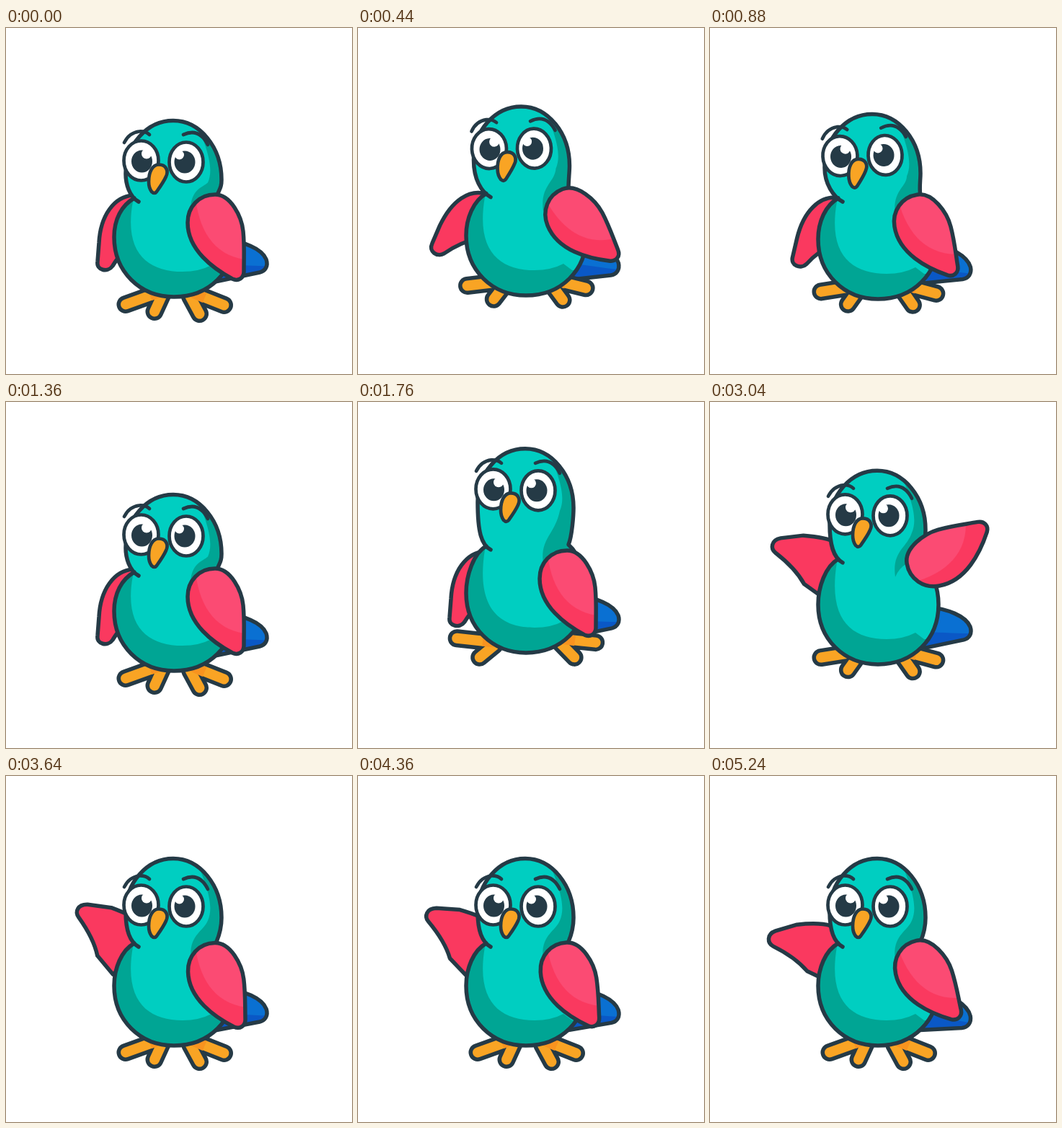
These frames come from a looping animation (480x480 px, 5280 ms). An HTML page:

```html
<!DOCTYPE html>
<html lang="en">
<head>
<meta charset="utf-8">
<title>Dancing parrot</title>
<style>
  html, body { margin: 0; width: 100%; height: 100%; overflow: hidden; background: #fff; }
  svg { display: block; width: 100%; height: 100%; }
  .ink { stroke: #253a46; stroke-width: 5.5; stroke-linecap: round; stroke-linejoin: round; }
  .line { fill: none; }
  .thin { stroke-width: 4.7; }
  .pink { fill: #fa395f; }
  .teal { fill: #00a594; }
  .foot { fill: none; stroke-linecap: round; stroke-linejoin: round; }
  .rim { stroke: #253a46; stroke-width: 25; }
  .skin { stroke: #f9a424; stroke-width: 14; }
  .shade { stroke: #f8931f; stroke-width: 14; stroke-linecap: butt; }
</style>
</head>
<body>
<svg viewBox="0 0 480 480">
  <defs>
    <clipPath id="bodyClip"><path id="bodyMask"/></clipPath>
    <clipPath id="wingClip"><use href="#wingShape"/></clipPath>
    <clipPath id="tailClip"><use href="#tailShape"/></clipPath>
    <path id="wingShape" d="M2 -31C-20 -31 -36 -14 -36 8C-36 46 0 72 26 86C34 90 42 85 42 76C42 55 43 40 41 20C39 0 24 -31 2 -31Z"/>
    <path id="tailShape" d="M10 -35C40 -32 65 -22 71 -7C74 2 70 9 62 11L0 24Z"/>
    <path id="leftToes" d="M0 0L50 -18M40 10L51 -14"/>
    <path id="rightToes" d="M0 0L-43 -17M-34 12L-47 -12"/>
  </defs>

  <path id="leftWing" class="ink pink"/>
  <g id="tail">
    <use href="#tailShape" fill="#0a58c6"/>
    <path clip-path="url(#tailClip)" fill="#0a70d2" d="M0 -45H80V2C55 3 30 0 0 0Z"/>
    <use href="#tailShape" class="ink line"/>
  </g>
  <g id="leftFoot" class="foot">
    <use href="#leftToes" class="rim"/>
    <use href="#leftToes" class="skin"/>
    <path class="shade" d="M34 -12L50 -18"/>
  </g>
  <g id="rightFoot" class="foot">
    <use href="#rightToes" class="rim"/>
    <use href="#rightToes" class="skin"/>
    <path class="shade" d="M-27 -10L-43 -17"/>
  </g>

  <path id="bodyFill" class="teal"/>
  <path id="bodyLight" fill="#00cec1" clip-path="url(#bodyClip)"/>
  <path id="bodyLine" class="ink line"/>

  <g id="face">
    <g class="ink thin" fill="#fff">
      <ellipse cx="187.5" cy="184" rx="24" ry="27.5"/>
      <ellipse cx="250" cy="186" rx="23.5" ry="27.5"/>
    </g>
    <g fill="#253a46">
      <ellipse cx="188.5" cy="185" rx="14.5" ry="15.5"/>
      <ellipse cx="248" cy="186" rx="14.5" ry="15.5"/>
    </g>
    <g fill="#fff">
      <circle cx="195" cy="174.5" r="7"/>
      <circle cx="240.5" cy="176" r="6.5"/>
    </g>
    <path class="ink thin" fill="#f9a424" d="M198 213C198 200 203 189.5 212 189.5C222 189.5 226 198 222 206C219 213 214 220 209 227Q206 231 202 227C199 223 198 218 198 213Z"/>
    <path class="ink line thin" d="M164 159Q171 145 185 143.5Q194 143 199 148M246 148Q268 138 280 162"/>
  </g>

  <g id="rightWing">
    <use href="#wingShape" class="pink"/>
    <path clip-path="url(#wingClip)" fill="#fb4b73" d="M-26 -40C-24 14 -2 56 50 60V-40Z"/>
    <use href="#wingShape" class="ink line"/>
  </g>
</svg>
<script>
const LOOP = 5280, BEAT = 680, JUMP_START = 2 * BEAT, WAVE_START = 5 * BEAT;
const $ = id => document.getElementById(id);
const put = (id, x, y, angle) =>
  $(id).setAttribute("transform", `translate(${x} ${y}) rotate(${angle})`);
const path = (id, d) => $(id).setAttribute("d", d);

// Pose: head top, face shift, neck, belly bottom, head lean,
// foot spread, foot lift, left wing, right wing, tail angle
const crouch = [128.5, 0, 241, 373, 0, 0, 0, 0, 0, 0];
const sway = [119.5, -8, 241, 376, -7, 1, -17, 11, 9, 6];
const hop = [101, -25, 228, 366, -4, 1.3, -30, 33, 32, 5];
const lift = [95.5, -28, 223, 364, 0, 1, -28, 96, 100, 0];
const air = [65, -63, 205, 348, 0, 2.4, -54, 0, 0, 0];
const peak = [60, -67, 203, 346, 0, 2.5, -56, 0, 0, 0];
const fall = [94, -32, 222, 362, 0, 1.2, -30, 14, 14, 2];
const stand = [114.5, -5, 237, 374, 0, 0, 0];

const hopKeys = [[0, crouch], [200, sway], [360, hop], [520, sway], [BEAT, crouch]];
const jumpKeys = [[0, crouch], [160, sway.map((v, i) => i === 4 ? 0 : v)],
  [320, lift], [400, air], [440, peak], [560, fall], [BEAT, crouch]];

// Cubic interpolation that rests at every local extreme
function sample(keys, t) {
  const k = Math.max(0, keys.findIndex(key => key[0] > t) - 1);
  const slope = (i, c) => (keys[i + 1][1][c] - keys[i][1][c]) / (keys[i + 1][0] - keys[i][0]);
  const tangent = (i, c) => {
    if (i === 0 || i === keys.length - 1) return 0;
    const a = slope(i - 1, c), b = slope(i, c);
    return a * b <= 0 ? 0 : 2 * a * b / (a + b);
  };
  const [t0, from] = keys[k], [t1, to] = keys[k + 1];
  const span = t1 - t0, u = (t - t0) / span, v = 1 - u;
  return from.map((p, c) =>
    p * v * v * (1 + 2 * u) + to[c] * u * u * (3 - 2 * u)
    + span * u * v * (tangent(k, c) * v - tangent(k + 1, c) * u));
}

function wavePose(t) {
  const k = (1 - Math.cos(2 * Math.PI * (t - 4250) / BEAT)) / 2;
  const pose = [...stand, 116 - 32 * k, 12.5 * k, 9 * k];
  const u = Math.min(1, (t - WAVE_START) / 170), ease = u * u * (3 - 2 * u);
  return pose.map((p, i) => crouch[i] + (p - crouch[i]) * ease);
}

function poseAt(t) {
  if (t >= WAVE_START) return wavePose(t);
  return sample(t < JUMP_START ? hopKeys : jumpKeys, t % BEAT);
}

function draw(t) {
  const [top, face, neck, belly, lean, spread, rise, left, right, tail] = poseAt(t);
  const mid = belly - 83, x = v => v + lean;

  const body = `M178 ${neck - 5}C160 ${neck + 5} 150 ${mid - 24} 150 ${mid}`
    + `C150 ${mid + 48} 186 ${belly} 233 ${belly}C282 ${belly} 317 ${mid + 48} 317 ${mid}`
    + `C317 ${mid - 22} 308 ${neck + 7} 292 ${neck - 7}`
    + `C${x(297)} ${neck - 19} ${x(299)} ${top + 92} ${x(299)} ${top + 82}`
    + `C${x(299)} ${top + 37} ${x(269)} ${top} ${x(232)} ${top}`
    + `C${x(195)} ${top} ${x(166)} ${top + 34} ${x(166)} ${top + 74}`
    + `C${x(166)} ${neck - 25} 171 ${neck - 7} 184 ${neck}`;
  for (const id of ["bodyMask", "bodyFill", "bodyLine"]) path(id, body);

  path("bodyLight", `M150 ${top - 10}H${x(258)}`
    + `C${x(282)} ${top + 42} ${x(288)} ${top + 68} ${x(280)} ${top + 86}`
    + `C273 ${neck - 20} 252 ${neck - 16} 257 ${neck + 20}Q262 ${neck + 8} 272 ${neck + 2}`
    + `L325 ${neck + 10}V${belly - 35}L297 ${belly - 35}L285 ${belly - 44}`
    + `Q268 ${belly - 35} 245 ${belly - 35}C196 ${belly - 35} 163 ${belly - 62} 176 ${neck}`
    + `L150 ${neck - 10}Z`);

  $("face").setAttribute("transform",
    `translate(${lean} ${face}) rotate(${lean * 0.4} 220 185)`);

  // The left wing broadens at the shoulder as it opens
  const open = left / 96, mix = (a, b) => a + (b - a) * open;
  path("leftWing", `M${mix(8, -12)} -18C${mix(-18, -38)} -16 ${mix(-37, -43)} 10 ${mix(-39, -42)} 48`
    + `L${mix(-41, -35)} ${mix(74, 79)}`
    + `C${mix(-43, -31)} ${mix(86, 92)} ${mix(-27, -19)} ${mix(90, 92)} ${mix(-20, -14)} ${mix(80, 84)}`
    + `C${mix(-10, -1)} 63 ${mix(6, 12)} 49 ${mix(17, 25)} 40L42 10Z`);
  put("leftWing", 168 + 5 * open, belly - 123 - 9 * open, left);
  put("rightWing", 288 + 16 * Math.sin(right * Math.PI / 200), belly - 111 - 0.32 * right, -right);
  put("tail", 290, belly - 45, tail);
  put("leftFoot", 166 - 12 * spread, 383.5 + rise * 1.03, 10.8 * spread);
  put("rightFoot", 302.5 + 11.3 * spread, 384.5 + rise * 0.94, -6.5 * spread);
}

const start = performance.now();
function tick() {
  draw((performance.now() - start) % LOOP);
  requestAnimationFrame(tick);
}
tick();
</script>
</body>
</html>
```
